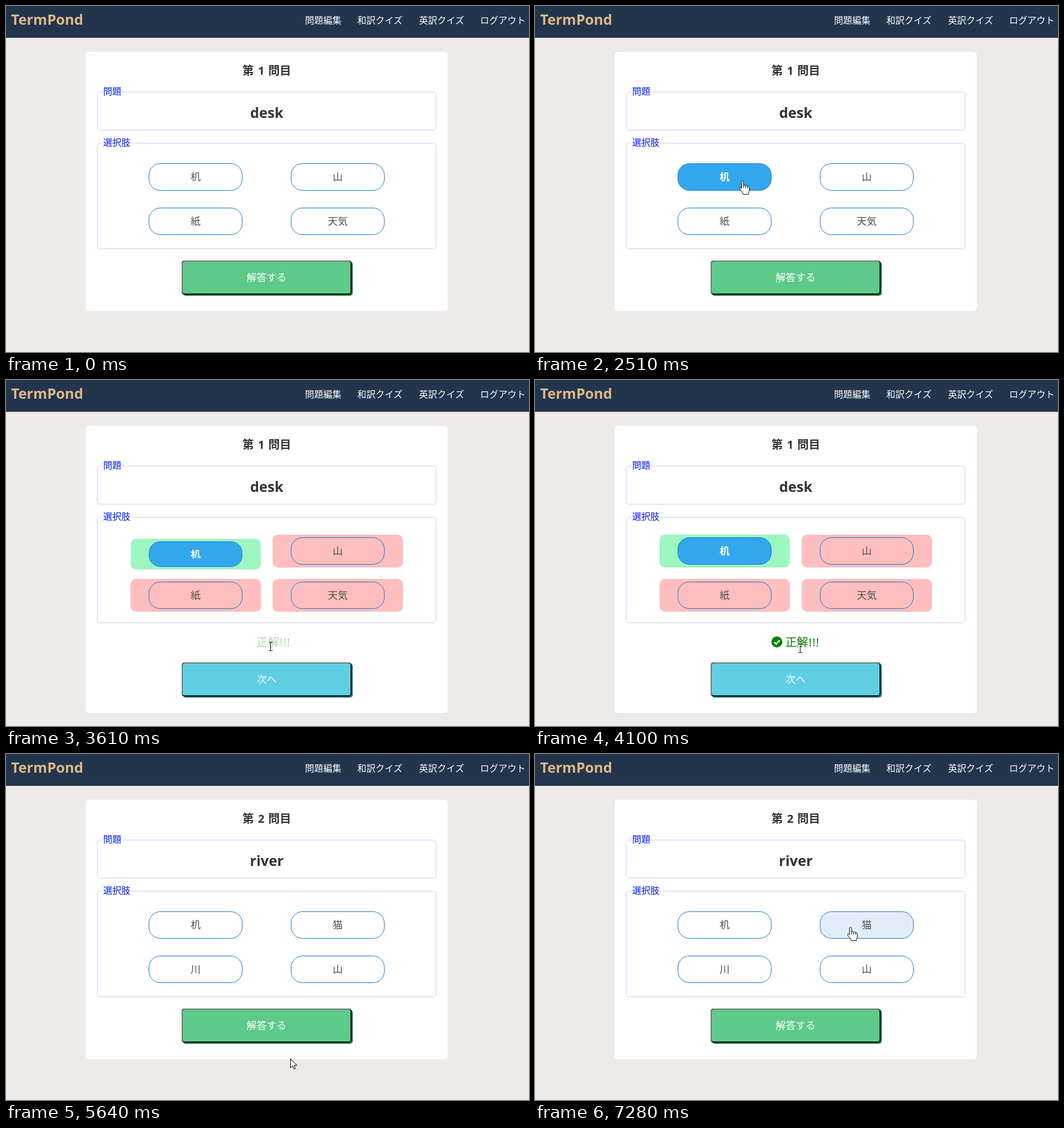
Recreate the animation shown at these times as an HTML page. Size 920 by 609 pixels, loop 8 s.

```html
<!DOCTYPE html>
<html lang="ja">
<head>
<meta charset="utf-8">
<title>Quiz</title>
<style>
  html, body { margin: 0; width: 100%; height: 100%; overflow: hidden; background: #eeeae7; }
  svg { display: block; width: 920px; height: 609px; }
  text { font: 17.6px "Noto Sans", "Noto Sans CJK JP", "Noto Sans CJK", sans-serif; fill: #333; }
  .mid { text-anchor: middle; }
  .logo { font-size: 25px; font-weight: 700; fill: #deb887; }
  .nav text { font-size: 16px; fill: #fff; }
  .title text { font-size: 20px; font-weight: 700; }
  #word { font-size: 25px; font-weight: 700; }
  .legend { font-size: 16px; fill: #0018ff; }
  .frame { fill: none; stroke: #c5cdf8; }
  .pill { fill: none; stroke: #0a76d6; }
  #choices text { fill: #505050; }
  .hover .pill { fill: #e2ecf8; }
  .checked .pill { fill: #33a7ee; }
  #choices .checked text { fill: #fff; font-weight: 700; }
  .mark { fill: #ffbebe; visibility: hidden; }
  .right .mark { fill: #9df5c0; }
  .answered .mark { visibility: visible; }
  #result text { font-size: 20px; fill: green; }
  #button text { fill: #fff; }
  .edge { fill: none; stroke-width: 2; }
  #low { stroke: #111; }
  #high { stroke: #767676; }
  .pressed #low { stroke: #767676; }
  .pressed #high { stroke: #222; }
  .pressed #shadow { visibility: hidden; }
  #cursor path { stroke: #000; fill: #fff; stroke-linejoin: round; }
  #cursor .line { fill: none; }
</style>
</head>
<body>
<svg id="stage" viewBox="0 0 920 609">
  <rect width="920" height="609" fill="#eeeae7"/>
  <rect width="920" height="56" fill="#22354d"/>
  <text class="logo" x="9" y="33">TermPond</text>
  <g class="nav">
    <text x="526" y="31.3">問題編集</text>
    <text x="618" y="31.3">和訳クイズ</text>
    <text x="726.5" y="31.3">英訳クイズ</text>
    <text x="834" y="31.3">ログアウト</text>
  </g>

  <rect id="card" x="140" y="80.5" width="637" rx="6" fill="#fff"/>
  <g class="title">
    <text x="416" y="120.6">第</text>
    <text id="number" class="mid" x="449" y="120.6"></text>
    <text x="461.5" y="120.6">問目</text>
  </g>

  <rect class="frame" x="160.5" y="151.5" width="596" height="67" rx="5"/>
  <rect x="169" y="149" width="35" height="5" fill="#fff"/>
  <text class="legend" x="171" y="156">問題</text>
  <text id="word" class="mid" x="458.7" y="197"></text>

  <rect class="frame" x="160.5" y="241.5" width="596" height="186" rx="5"/>
  <rect x="169" y="239" width="51" height="5" fill="#fff"/>
  <text class="legend" x="171" y="246">選択肢</text>
  <g id="choices"></g>

  <g id="result">
    <g id="tick">
      <circle cx="425.5" cy="461" r="9.7" fill="green"/>
      <path d="M420.8 461.3L424.2 464.7L430.5 458" fill="none" stroke="#fff" stroke-width="2.4"/>
    </g>
    <text x="440.5" y="468.5">正解</text>
    <text x="481.5" y="468.5" letter-spacing="1">!!!</text>
  </g>

  <g id="button">
    <rect id="shadow" x="2" y="2" width="299" height="60" rx="5"/>
    <rect id="face" width="299" height="60" rx="5"/>
    <rect id="low" class="edge" x="1" y="1" width="297" height="58" rx="4"/>
    <path id="high" class="edge" d="M2.2 57.8A4 4 0 0 1 1 55V5A4 4 0 0 1 5 1H294A4 4 0 0 1 296.8 2.2"/>
    <text id="label" class="mid" x="149.5" y="35.5"></text>
  </g>

  <circle id="click" r="12" fill="#c8e632" fill-opacity=".75"/>
  <g id="cursor">
    <path id="arrow" d="M.5 .5V16.5L4.3 13L6.8 18.7L9.2 17.7L6.8 12.1H11.8Z"/>
    <g id="hand">
      <path d="M-1.8 1.8C-1.8-.6 1.8-.6 1.8 1.8V8C3 6.8 5.2 7 5.4 8.8C7 7.6 8.8 8 9 9.8C10.5 8.8 12 9.6 12 11.5V16.5C12 19 10.5 20 10.3 23.5H1.2C1 20.5-3 17-5 13.8C-5.8 12-4 10.8-2.8 12L-1.8 13.2Z"/>
      <path class="line" d="M1.8 8V12M5.4 8.8V12.5M9 9.8V13"/>
    </g>
    <path id="beam" class="line" d="M-1-6.5H2L2.5-6L3-6.5H6M2.5-6V8M-1 8.5H2L2.5 8L3 8.5H6"/>
  </g>
</svg>

<script>
const LOOP = 8000, STEP = 69;
const CHECKED = 2240, SUBMIT = 3270, ANSWERED = 3400, NEXT = 5370, SECOND = 5500;
const $ = id => document.getElementById(id);
const show = (el, on) => el.style.display = on ? '' : 'none';
const within = (t, from, to) => t >= from && t < to;
const inBox = (p, x, y, w, h) => within(p.x, x, x + w) && within(p.y, y, y + h);

const questions = [
  { word: 'desk', options: ['机', '山', '紙', '天気'] },
  { word: 'river', options: ['机', '猫', '川', '山'] }
];

// time, x, y
const pointerPath = [
  [460, 735, 590], [1220, 419, 274], [1560, 346, 294], [2040, 362, 302],
  [2440, 362, 302], [3070, 463, 468], [4030, 463, 468], [4650, 501, 543],
  [5500, 501, 543], [6110, 493, 493], [6180, 493, 493], [6810, 347, 311],
  [6940, 347, 311], [7280, 555, 305]
];
// time, vertical shift, vertical scale
const bouncePath = [
  [3400, 0, 1], [3500, -10, 1.03], [3610, 5.5, .93], [3750, -4, 1.03],
  [3890, 2, .98], [4030, 0, 1]
];

function sample(path, t) {
  if (t <= path[0][0]) return path[0].slice(1);
  const next = path.findIndex(key => key[0] > t);
  if (next < 0) return path[path.length - 1].slice(1);
  const from = path[next - 1], to = path[next];
  const held = Math.floor((t - from[0]) / STEP) * STEP;
  const u = held / (to[0] - from[0]), k = u * u * (3 - 2 * u);
  return from.slice(1).map((v, i) => v + (to[i + 1] - v) * k);
}

const choices = [0, 1, 2, 3].map(i => {
  const x = i % 2 ? 501.5 : 251.5, y = i > 1 ? 355.5 : 277.5;
  $('choices').insertAdjacentHTML('beforeend', `<g>
    <rect class="mark" x="${x - 32.5}" y="${y - 5.5}" width="229.5" height="58" rx="10"/>
    <rect class="pill" x="${x}" y="${y}" width="164" height="47" rx="20"/>
    <text class="mid" x="${x + 82}" y="${y + 29}"></text></g>`);
  const el = $('choices').lastElementChild;
  return { x, y, el, text: el.querySelector('text') };
});

function drawChoices(t, pointer, second, answered) {
  let hovered = false;
  choices.forEach(({ x, y, el, text }, i) => {
    const over = pointer.on && inBox(pointer, x, y, 164, 47);
    const checked = i === 0 && within(t, CHECKED, SECOND);
    hovered = hovered || over;
    text.textContent = questions[+second].options[i];
    el.classList.toggle('hover', over && !checked);
    el.classList.toggle('checked', checked);
    el.classList.toggle('right', i === 0);
  });
  const [shift, scale] = answered ? sample(bouncePath, t) : [0, 1];
  choices[0].el.setAttribute('transform',
    `translate(334 ${301 + shift}) scale(${1 - (1 - scale) * .06} ${scale}) translate(-334 -301)`);
  return hovered;
}

function drawButton(t, pointer, answered) {
  const y = answered ? 497 : 448;
  const pressed = within(t, SUBMIT, ANSWERED) || within(t, NEXT, SECOND);
  const over = pointer.on && inBox(pointer, 309, y, 299, 60);
  const push = pressed ? 2 : 0;
  $('button').setAttribute('transform', `translate(${309 + push} ${y + push})`);
  $('button').setAttribute('opacity', over ? .8 : 1);
  $('button').setAttribute('class', pressed ? 'pressed' : '');
  $('face').setAttribute('fill', answered ? '#5fcfe4' : '#5dca8a');
  $('shadow').setAttribute('fill', answered ? '#1b7788' : '#1a7a42');
  $('label').textContent = answered ? '次へ' : '解答する';
}

function draw(t) {
  const second = t >= SECOND, answered = within(t, ANSWERED, SECOND);
  const [x, y] = sample(pointerPath, t);
  const pointer = { x, y, on: t >= 460 };

  $('number').textContent = second ? 2 : 1;
  $('word').textContent = questions[+second].word;
  $('card').setAttribute('height', answered ? 505.5 : 456.5);
  $('choices').setAttribute('class', answered ? 'answered' : '');

  const hand = drawChoices(t, pointer, second, answered);
  drawButton(t, pointer, answered);

  show($('result'), answered);
  $('result').setAttribute('opacity', Math.min(1, Math.max(0, (t - ANSWERED) / 700)));
  show($('tick'), t >= 3680);

  const beam = answered && inBox(pointer, 416, 448, 86, 27);
  show($('cursor'), pointer.on);
  show($('hand'), hand);
  show($('beam'), beam);
  show($('arrow'), !hand && !beam);
  $('cursor').setAttribute('transform', `translate(${Math.round(x)} ${Math.round(y)})`);
  $('click').setAttribute('transform', `translate(${x - 1} ${y})`);
  show($('click'), within(t, CHECKED, 2310) || within(t, SUBMIT, ANSWERED) || within(t, NEXT, SECOND));
}

const start = performance.now();
function tick() {
  draw((performance.now() - start) % LOOP);
  requestAnimationFrame(tick);
}
tick();
</script>
</body>
</html>
```
